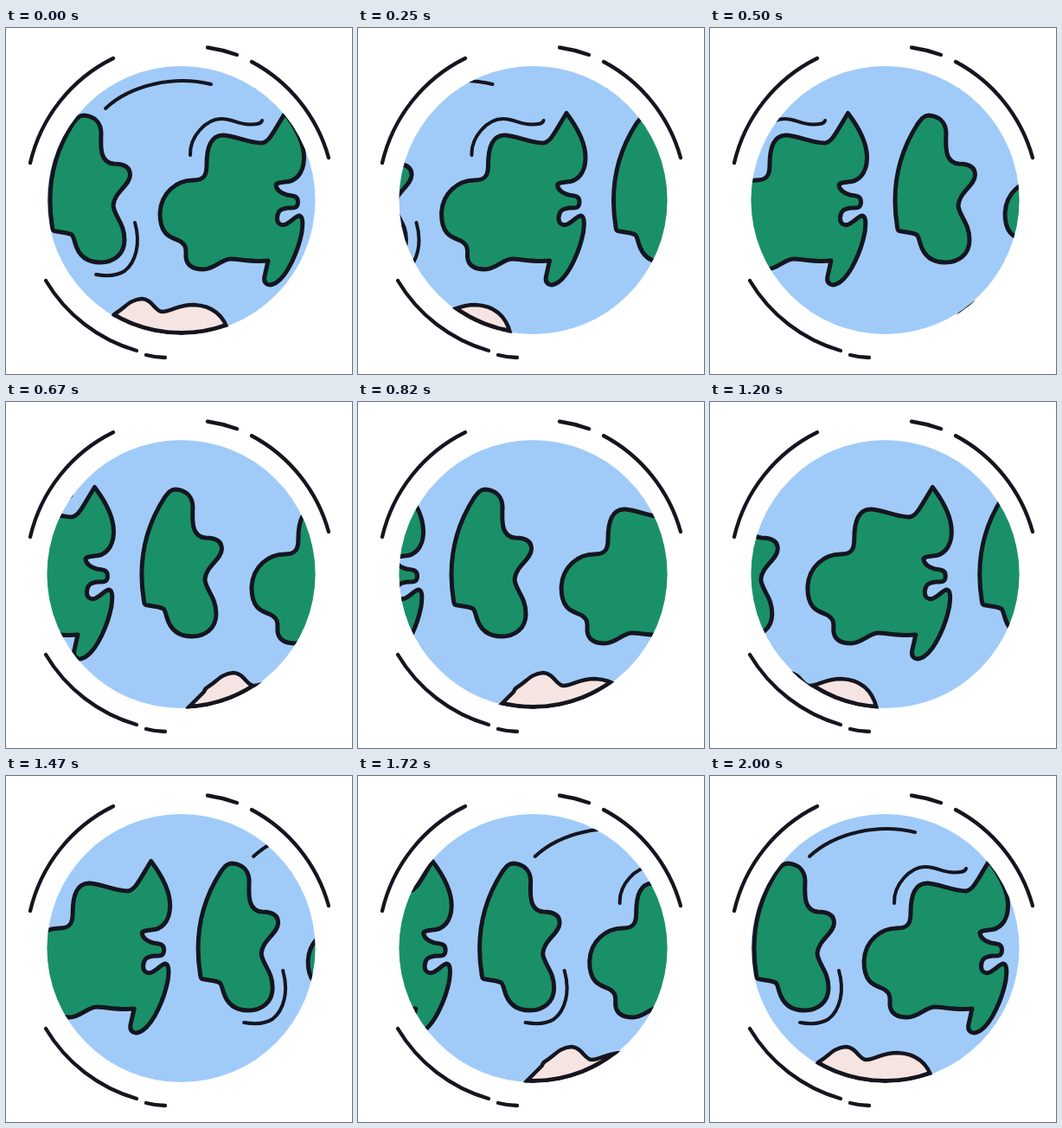
Recreate the animation shown at these times as an HTML page with a canvas. Size 400 by 400 pixels, loop 2020 ms.

```html
<!DOCTYPE html>
<html lang="en">
<head>
<meta charset="utf-8">
<title>Spinning globe</title>
<style>
  html, body { margin: 0; width: 100%; height: 100%; overflow: hidden; background: #fff; }
  canvas { display: block; }
</style>
</head>
<body>
<canvas width="400" height="400"></canvas>
<script>
const ctx = document.querySelector('canvas').getContext('2d');
const INK = '#15151f', SEA = '#a0cbf9', LAND = '#1a9068', ICE = '#f5e4e1';
const LOOP = 2020, STEPS = 80, SPAN = 326;

const land = new Path2D(
  'M90 101C103 102 110 110 110 122C109 142 110 156 125 157C138 157 143.5 162 143.5 170' +
  'C143 182 125 190 124 205C125 218 137 225 137 245C137 262 124 271 109 271' +
  'C93 271 84 263 80 249C77 239 78 239 70 237L58 235C54 235 54 233 53.5 230' +
  'C47 190 52 150 77 111C82 104 85 101 90 101Z' +
  'M322.5 98.5C332 111 345 132 344.5 151C344 169 334 178 322 178C317 179 312 179 312 182' +
  'C313 188 318 191 325 193C332 194 337.5 194 337.5 201C337.5 209 332 208 326 208' +
  'C317 209 314 212 313.5 219C313 226 318 229 323 227C330 224 335 217 339 217' +
  'C344 218 343 228 342 236C338 257 326 285 313 294C304 300 297 296 299 287L303 269' +
  'C286 271 269 267 260 267C249 267 241 279 228 279C215 279 209 274 208 265' +
  'C208 256 209 252 202 247C194 242 178 243 178 214C179 190 198 176 216 176' +
  'C230 176 232 169 232 158C232 138 237 123 252 124C266 125 280 133 296 133' +
  'C304 132 308 122 322.5 98.5Z');
const ice = new Path2D(
  'M104 354L123 335Q124 331 128 329C138 323 143 314 157 313C170 314 172 328 181 328' +
  'C190 328 198 320 217 320C240 321 253 334 258 354L258 375L104 375Z');
const wind = new Path2D(
  'M115 93C145 65 195 55 237 65' +
  'M149 225C156 249 150 271 137 281C128 287 116 287 104 285' +
  'M213 147C212 125 232 105 249 105C262 105 268 111.5 282 111.5C289 111.5 295 111 296 107');
const orbit = new Path2D(
  'M28 156A180.5 180.5 0 0 1 124 35M233 22.5Q250 25 267 31M284 39A180.5 180.5 0 0 1 373 150' +
  'M46 292A180.5 180.5 0 0 0 151 373M162 378Q173 381 184 381');
const globe = disc(155), rim = disc(153.5), edge = disc(156);

function disc(radius) {
  const path = new Path2D();
  path.arc(202.5, 199, radius, 0, 7);
  return path;
}

function fill(path, color) {
  ctx.fillStyle = color;
  ctx.fill(path);
}

function line(path, width) {
  ctx.lineWidth = width;
  ctx.stroke(path);
}

// Draws inside a clip, moved sideways by x
function within(clip, x, paint) {
  ctx.save();
  ctx.clip(clip);
  ctx.translate(x, 0);
  paint();
  ctx.restore();
}

function drawUnit(x, windy) {
  within(globe, x, () => {
    fill(land, LAND);
    line(land, 5);
    if (windy) line(wind, 4);
  });
  within(edge, x, () => {
    fill(ice, ICE);
    line(ice, 4.5);
    // the rim stays put and shows only across the ice
    within(ice, -x, () => line(rim, 5));
  });
}

function draw(now) {
  const t = now % LOOP;
  const step = Math.floor(t / 50) * 2 + (t % 50 >= 20 ? 1 : 0);
  const shift = Math.min(step, STEPS) / STEPS * 2 * SPAN;

  ctx.clearRect(0, 0, 400, 400);
  ctx.strokeStyle = INK;
  ctx.lineCap = ctx.lineJoin = 'round';
  line(orbit, 4.3);
  fill(globe, SEA);
  for (let i = 0; i < 3; i++) drawUnit(i * SPAN - shift, i % 2 === 0);
}

const start = performance.now();
function tick() {
  draw(performance.now() - start);
  requestAnimationFrame(tick);
}
tick();
</script>
</body>
</html>
```
